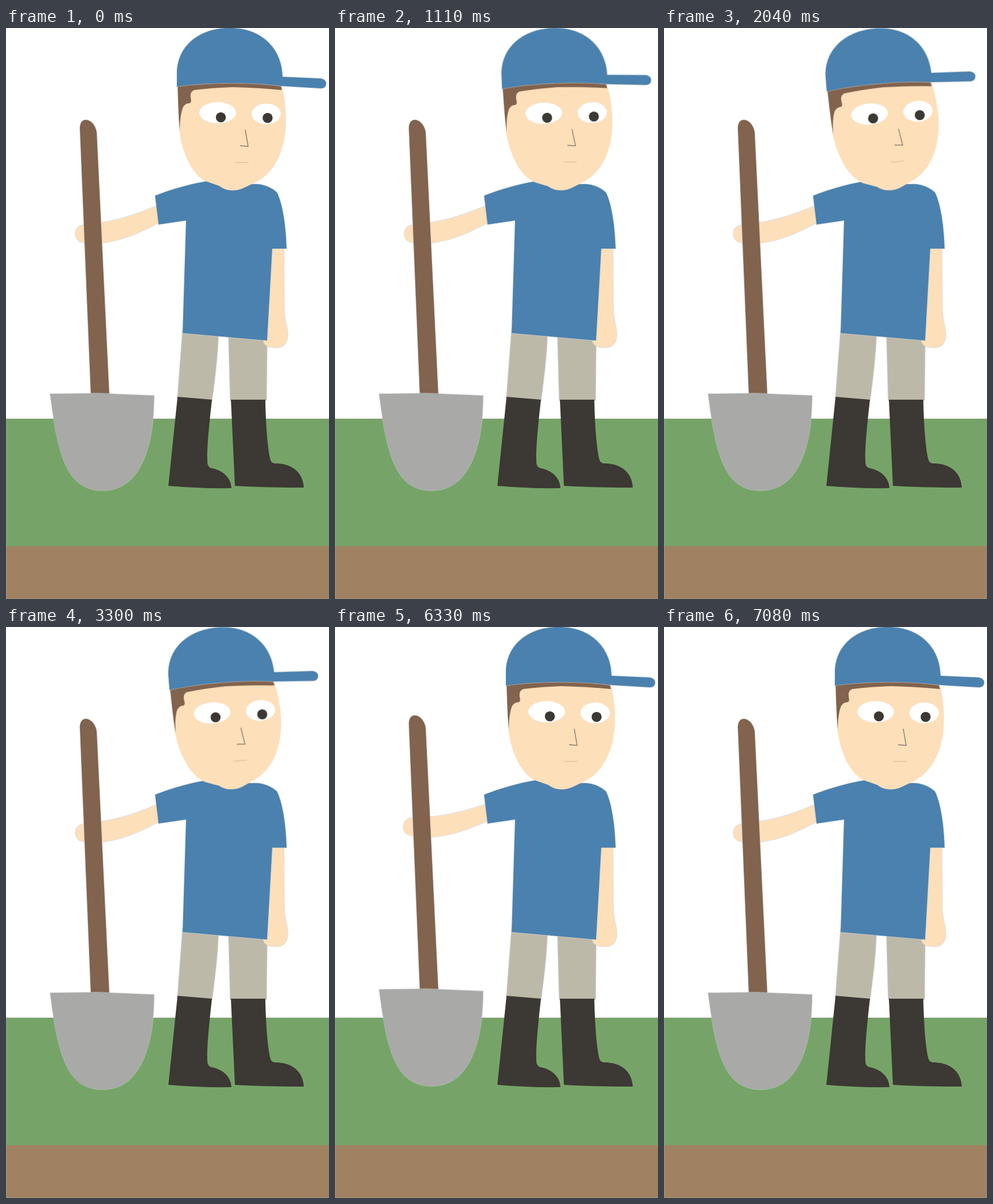
These frames come from a looping animation (563x994 px, 7.14 s). An HTML page without scripts:

```html
<!DOCTYPE html>
<html lang="en">
<head>
<meta charset="utf-8">
<title>Gardener with shovel</title>
<style>
  html, body { margin: 0; width: 100%; height: 100%; overflow: hidden; background: #fff; }
  svg { display: block; width: 100%; height: 100%; }

  .skin  { fill: #fddfba; }
  .blue  { fill: #4a81ae; }
  .brown { fill: #82634d; }
  .trousers { fill: #bdb9a9; }
  .dark  { fill: #3c3833; }
  .steel { fill: #a9a9a7; }
  .edge  { stroke: #c3cbd0; stroke-opacity: .6; stroke-width: 2; paint-order: stroke; }

  .head, .arm, .shovel, .pupil {
    animation: 7140ms -4ms infinite;
  }
  .head   { animation-name: tilt;  transform-origin: 392px 278px; }
  .arm    { animation-name: raise; transform-origin: 285px 328px; }
  .shovel { animation-name: lift; }
  .pupil  { animation-name: blink; transform-box: fill-box; transform-origin: center; }

  @keyframes tilt {
    0%, 100%  { transform: rotate(0deg); }
    12.185%   { transform: rotate(0deg); animation-timing-function: steps(17); }
    19.328%   { transform: rotate(-4.7deg); }
    45.798%   { transform: rotate(-4.7deg); animation-timing-function: steps(12); }
    50.84%    { transform: rotate(0deg); }
  }
  @keyframes lift {
    0%, 93.277%, 100% { transform: translateY(0); }
    88.235%   { transform: translateY(0); animation-timing-function: steps(6); }
    90.756%   { transform: translateY(-36px); animation-timing-function: steps(6); }
  }
  @keyframes raise {
    0%, 93.277%, 100% { transform: rotate(0deg); }
    88.235%   { transform: rotate(0deg); animation-timing-function: steps(6); }
    90.756%   { transform: rotate(24deg); animation-timing-function: steps(6); }
  }
  @keyframes blink {
    0%, 28.571%, 99.16%, 100% { transform: scaleY(1); }
    26.05%, 96.639%  { transform: scaleY(1); animation-timing-function: steps(3); }
    27.311%, 97.899% { transform: scaleY(.1); animation-timing-function: steps(3); }
  }
</style>
</head>
<body>
<svg viewBox="0 0 563 994" preserveAspectRatio="none">
  <!-- ground -->
  <rect y="680" width="563" height="222" fill="#76a468"/>
  <rect y="902" width="563" height="92" fill="#a08262"/>
  <path d="M563 680.5H.5V993.5H563" fill="none" stroke="#9a9c90" stroke-opacity=".7"/>

  <!-- legs and boots -->
  <path class="trousers edge" d="M308 525L370 535Q369 575 359 648L299 643Z"/>
  <path class="trousers edge" d="M388 535L455 540L454 648H391Z"/>
  <path class="dark" d="M299 642L359 647C353 700 350 735 351 755Q351 764 357 766C378 770 392 782 393 801Q338 802 283 797Z"/>
  <path class="dark" d="M392 647H452C453 700 457 738 461 752Q463 758 470 758C500 758 518 775 519 800Q450 800 399 797Z"/>

  <!-- arms -->
  <path class="skin edge" d="M462 380H484L485 495C486 512 491 518 491 536C490 552 480 557 468 556C452 556 447 548 449 540L455 520Z"/>
  <path class="arm skin edge" d="M290 300L264 309C232 323 200 334 165 339L140 343C127 342 121 350 121 358C121 368 128 374 140 374H168C205 370 235 355 268 338L292 328Z"/>

  <g class="shovel">
    <path class="brown edge" d="M129 178C128 164 134 160 139 160C147 160 156 168 158 182L180 639H148Z"/>
    <path class="steel edge" d="M77 637L160 636L258 640C258 715 240 805 168 805C103 805 90 735 77 637Z"/>
  </g>

  <path class="blue edge" d="M260 292C290 280 320 272 349 267L428 272C448 270 463 278 472 286C482 305 488 345 489 384H464L455 544L308 531L314 335L266 342Z"/>

  <g class="head">
    <path class="skin" d="M300 98L302 178C308 225 328 258 349 267L372 275C384 285 402 284 413 279L428 272C470 255 488 210 488 160C488 140 486 120 480 98Z"/>
    <path class="brown" d="M299 99L300 130Q301 160 303 178C303 160 305 146 309 137Q314 130 320 131Q324 130 322 122Q320 111 328 108Q360 104 395 103Q440 104 481 108L478 96Q380 92 299 99Z"/>
    <path class="blue edge" d="M298 102V80C298 30 338 0 390 0C445 0 481 35 482 85L549 88Q558 90 558 97Q557 105 549 105L482 101C430 94 350 94 298 102Z"/>
    <ellipse cx="369" cy="147.5" rx="32" ry="18.5" fill="#fff"/>
    <ellipse cx="453.5" cy="149.5" rx="25.5" ry="18" fill="#fff"/>
    <circle class="pupil dark" cx="374.5" cy="155.5" r="8.7"/>
    <circle class="pupil dark" cx="456" cy="156.5" r="8.7"/>
    <path d="M417 177L422 206L408 205" fill="none" stroke="#85786a" stroke-width="1.4"/>
    <path d="M399 234H423" stroke="#e0c6a0" stroke-width="1.5"/>
  </g>
</svg>
</body>
</html>
```
